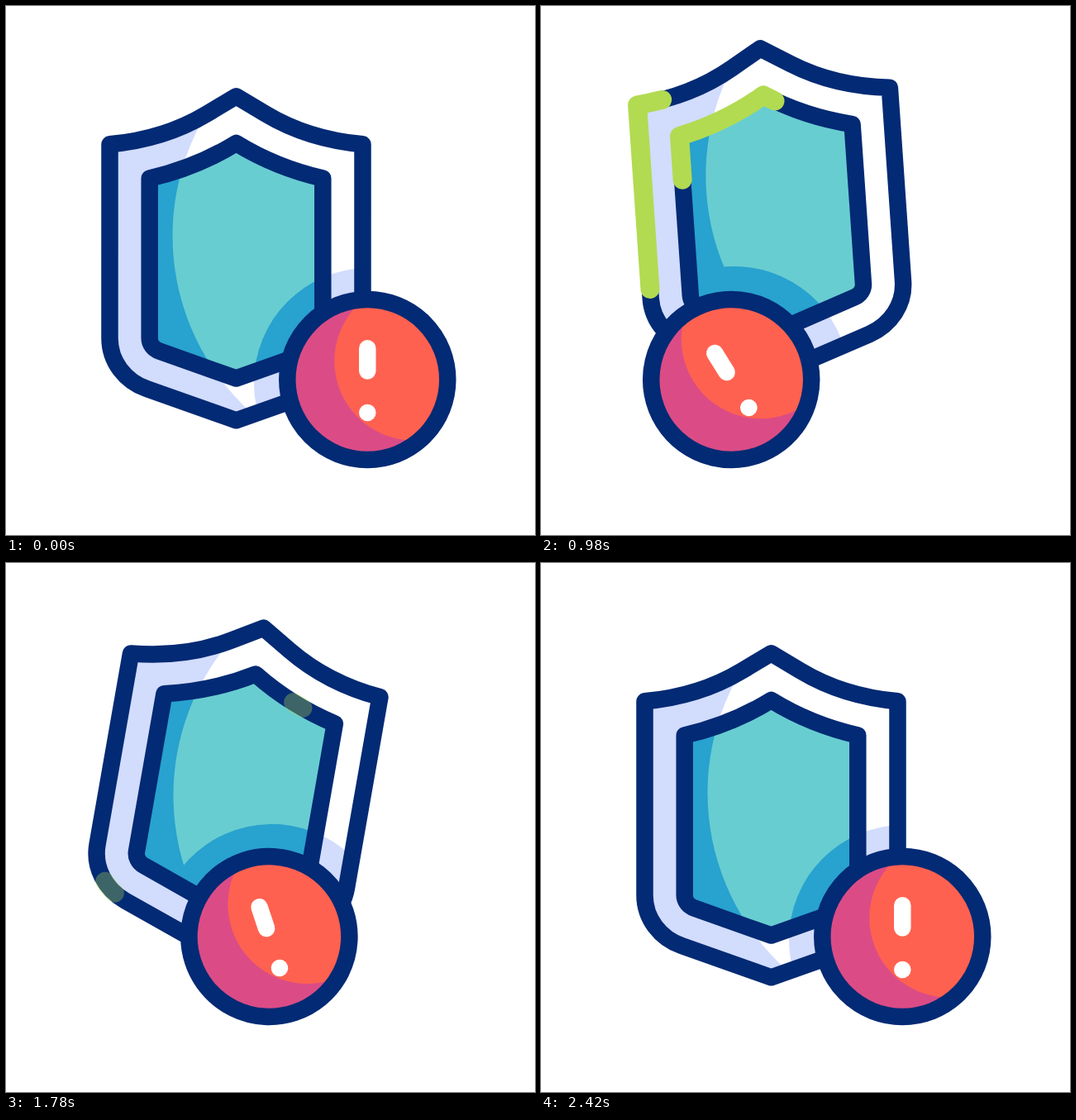
These frames come from a looping animation (640 by 640 pixels, 2620 ms). An HTML page:

```html
<!DOCTYPE html>
<html lang="en">
<head>
<meta charset="utf-8">
<title>Shield alert</title>
<style>
  html, body { margin: 0; width: 100%; height: 100%; overflow: hidden; background: #fff; }
  svg { display: block; width: 100%; height: 100%; }
  .line { fill: none; stroke: #032a74; stroke-width: 20.5; stroke-linejoin: round; }
  .glow { fill: none; stroke: #b2db51; stroke-width: 23; stroke-linecap: round; stroke-linejoin: round; }
</style>
</head>
<body>
<svg viewBox="0 0 640 640" xmlns="http://www.w3.org/2000/svg">
  <defs>
    <!-- outer runs clockwise from the bottom tip, inner counterclockwise from the right side -->
    <path id="outer" d="M278.5 501.3 L170.5 463.2 C144 453.7 125.5 430 125.5 402 V167.3
      C168 163.5 208 151.5 243 130.5 L278.5 109.3 L314 130.5 C349 151.5 389 163.5 431.5 167.3
      V402 C431.5 430 413 453.7 386.5 463.2 Z"/>
    <path id="inner" d="M383.3 258.5 V208.5 C346 200 311 186 278.5 166 C246 186 211 200 173.7 208.5
      V402 C173.7 409 178.5 415 185.5 417.5 L278.5 450.5 L371.5 417.5
      C378.5 415 383.3 409 383.3 402 Z"/>
    <clipPath id="outerClip"><use href="#outer"/></clipPath>
    <clipPath id="innerClip"><use href="#inner"/></clipPath>
    <clipPath id="ballClip"><circle r="97"/></clipPath>
  </defs>

  <g id="shield">
    <g clip-path="url(#outerClip)">
      <use href="#outer" fill="#d2dcfd"/>
      <circle cx="489.5" cy="278" r="288" fill="#fff"/>
      <circle class="shade" r="139.3" fill="#d2dcfd"/>
    </g>
    <g clip-path="url(#innerClip)">
      <use href="#inner" fill="#28a2ce"/>
      <circle cx="489.5" cy="278" r="288" fill="#68cdd1"/>
      <circle class="shade" r="139.3" fill="#28a2ce"/>
    </g>
    <use href="#outer" class="line"/>
    <use href="#inner" class="line"/>
    <g id="glows"></g>
  </g>

  <g id="ball">
    <g clip-path="url(#ballClip)">
      <circle r="97" fill="#db4c86"/>
      <circle cx="56" cy="-22.5" r="96" fill="#ff6150"/>
    </g>
    <path d="M0 -37.7 V-10.5" stroke="#fff" stroke-width="20.5" stroke-linecap="round"/>
    <circle cy="40" r="10.3" fill="#fff"/>
    <circle r="97" class="line"/>
  </g>
</svg>
<script>
const LOOP = 2620, HALF = 1200;
const PIVOT = { x: 278.5, y: 302 };
const $ = id => document.getElementById(id);
const shield = $('shield'), ball = $('ball'), glows = $('glows');
const shades = document.querySelectorAll('.shade');

const trails = ['outer', 'inner'].map(id => {
  const path = $(id).cloneNode();
  path.removeAttribute('id');
  path.setAttribute('class', 'glow');
  path.setAttribute('pathLength', 1);
  return glows.appendChild(path);
});

const clamp = v => Math.max(0, Math.min(1, v));
const ease = v => { v = clamp(v); return v * v * (3 - 2 * v); };
const turn = (x, y, deg) => {
  const a = deg * Math.PI / 180, c = Math.cos(a), s = Math.sin(a);
  return [x * c - y * s, x * s + y * c];
};

function drawTrails(t) {
  const s = clamp((t - 600) / HALF);
  const alpha = clamp(Math.min(t - 600, 1800 - t) / 57);
  glows.setAttribute('opacity', alpha);
  glows.setAttribute('display', alpha > 0 ? 'inline' : 'none');
  const len = Math.max(0.001, 0.246 * 4 * s * (1 - s));
  const tail = 0.018 + 1.1 * ease(s) - len / 2;
  for (const path of trails) {
    path.setAttribute('stroke-dasharray', `${len} ${1 - len}`);
    path.setAttribute('stroke-dashoffset', -tail);
  }
}

function draw(t) {
  // out and back: the second half mirrors the first
  const m = Math.max(0, t < HALF ? t : 2 * HALF - t);
  const p = ease(m / HALF);
  const bx = 437.3 - 227 * p, by = 452, spin = -35 * p;
  const lift = -64 * p;
  const tilt = m < 600 ? 10 * ease(m / 600) : 10 - 20 * ease((m - 600) / 600);

  ball.setAttribute('transform', `translate(${bx} ${by}) rotate(${spin})`);
  shield.setAttribute('transform', `translate(0 ${lift}) rotate(${tilt} ${PIVOT.x} ${PIVOT.y})`);

  // ball shadow, brought into the shield's own coordinates
  const [ox, oy] = turn(2, 4, spin);
  const [sx, sy] = turn(bx + ox - PIVOT.x, by + oy - PIVOT.y - lift, -tilt);
  for (const c of shades) {
    c.setAttribute('cx', PIVOT.x + sx);
    c.setAttribute('cy', PIVOT.y + sy);
  }
  drawTrails(t);
}

const begin = performance.now();
function tick() {
  draw((performance.now() - begin) % LOOP);
  requestAnimationFrame(tick);
}
tick();
</script>
</body>
</html>
```
